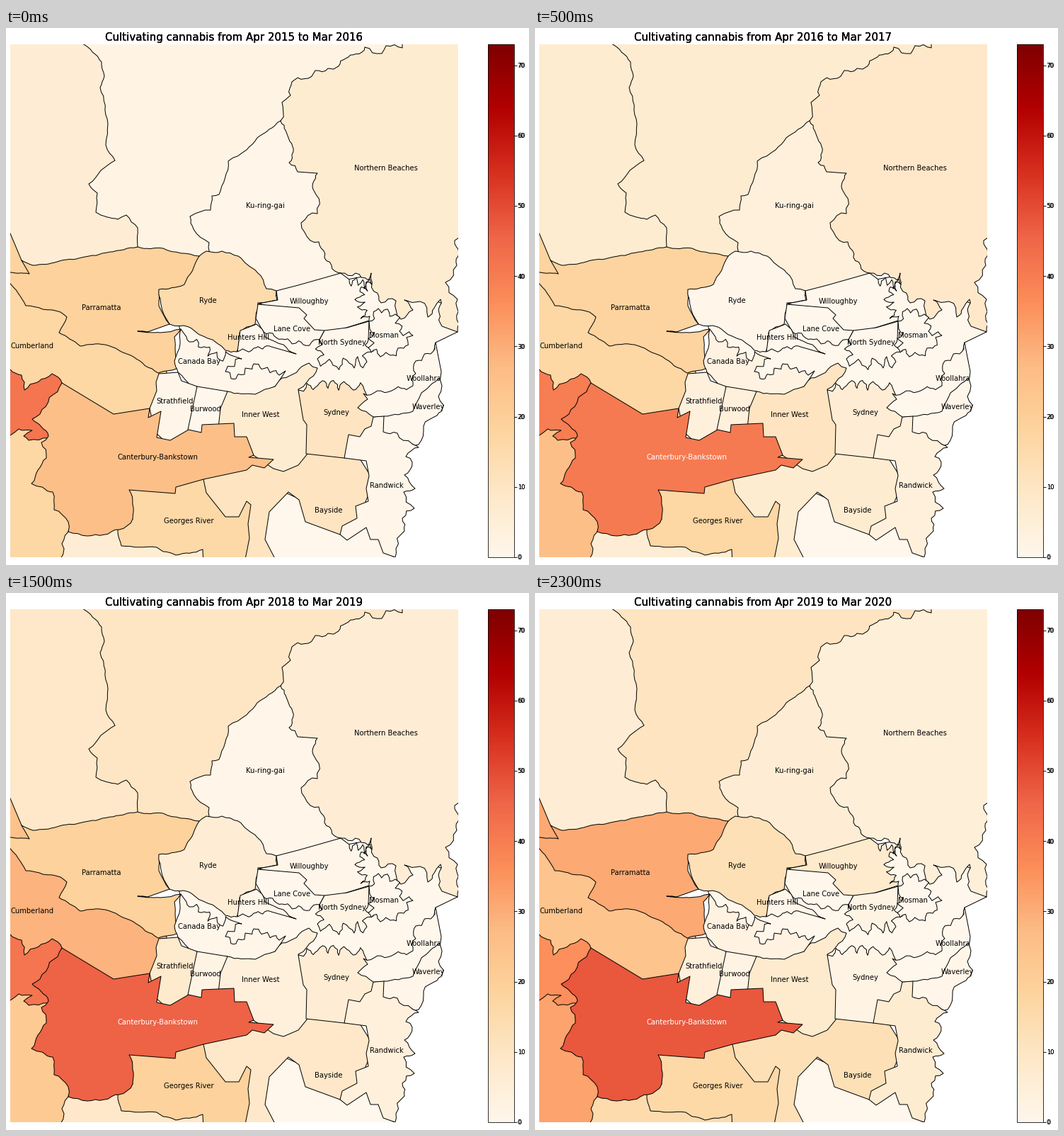
Recreate the animation shown at these times as a matplotlib script. Size 739 by 758 pixels, loop 2.5 s.

```python
import math
import random

import matplotlib.pyplot as plt
from matplotlib.animation import FuncAnimation
from matplotlib.patches import Polygon, Rectangle

W, H, DPI = 739, 758, 64
PX = 72 / DPI  # points per pixel
VMAX = 73
LEFT, TOP, RIGHT, BOTTOM = 6, 22.5, 639, 747

random.seed(4)
plt.rcParams["font.family"] = "DejaVu Sans"
fig = plt.figure(figsize=(W / DPI, H / DPI), dpi=DPI, facecolor="white")
ax = fig.add_axes([0, 0, 1, 1])
ax.axis("off")
cmap = plt.get_cmap("OrRd")
frame_box = Rectangle((LEFT, TOP), RIGHT - LEFT, BOTTOM - TOP, fc="none", ec="none")
ax.add_patch(frame_box)
areas = []


def write(x, y, text, size, **kw):
    return ax.text(x, y, text, fontsize=size * PX, va="baseline", **kw)


def beside(a, b, t, shift):
    """Point at share t of side a-b, moved sideways by shift pixels."""
    dx, dy = b[0] - a[0], b[1] - a[1]
    d = math.hypot(dx, dy) or 1
    return a[0] + dx * t - dy / d * shift, a[1] + dy * t + dx / d * shift


def wiggle(points, k=0.13, step=8):
    """River or coast: split each side at random bends until it is short."""
    out = [points[0]]
    for a, b in zip(points, points[1:]):
        d = math.dist(a, b)
        if d > step:
            mid = beside(a, b, 0.5, random.uniform(-k, k) * min(d, 28))
            out += wiggle([a, mid, b], k, step)[1:]
        else:
            out.append(b)
    return out


def coves(points, depth=6, step=7):
    """Harbour shore: inlets and points in turn along each side."""
    out, sign = [points[0]], 1
    for a, b in zip(points, points[1:]):
        n = max(1, round(math.dist(a, b) / step))
        for i in range(1, n):
            out.append(beside(a, b, i / n, sign * depth * random.uniform(0.4, 1)))
            sign = -sign
        out.append(b)
    return wiggle(out, 0.16, 6)


def area(counts, points, name="", at=(0, 0)):
    """Later areas cover earlier ones, so each border is traced only once."""
    shape = Polygon(points, ec="black", lw=PX, joinstyle="round",
                    zorder=1 + len(areas) / 100)
    ax.add_patch(shape)
    shape.set_clip_path(frame_box)
    label = write(at[0], at[1] + 3.7, name, 10, ha="center", zorder=3)
    areas.append((counts, shape, label))


NONE = [0] * 5

# Harbour and bay
area(NONE, [(240, 400), (340, 380), (510, 350), (620, 390), (638, 429), (607, 444),
            (590, 530), (480, 560), (260, 490)])
area(NONE, [(360, 640), (470, 690), (540, 690), (549, 760), (360, 760)])

# Northern areas
area([2, 7, 5, 10, 11], [(0, 10), (575, 10), (480, 300), (280, 330), (0, 335)])
area([6, 7, 8, 9, 6], [(0, 10), (95, 10)] + wiggle([
    (108, 22), (135, 48), (139, 68), (133, 84), (144, 135), (141, 165), (154, 187),
    (134, 201), (117, 220), (129, 233), (127, 260), (158, 270), (170, 264), (186, 282),
    (186, 309)], 0.08) + [(186, 325), (40, 345), (0, 345)])
area([1, 4, 4, 1, 6], wiggle([
    (388, 131), (355, 155), (340, 172), (314, 188), (301, 235), (291, 237), (289, 257),
    (260, 266), (265, 284), (287, 303), (287, 315)], 0.09) + [
    (300, 330), (375, 380), (470, 352), (478, 335), (450, 200), (410, 140)],
    "Ku-ring-gai", (366, 250))
area([7, 9, 4, 6, 5], wiggle([
    (561, 15), (560, 28), (537, 25), (531, 36), (507, 27), (480, 43), (455, 57), (437, 60),
    (404, 76), (402, 95), (390, 105), (388, 131), (401, 160), (400, 190), (412, 203)], 0.2)
    + wiggle([
        (440, 205), (438, 235), (440, 262), (417, 275), (430, 300), (442, 302), (460, 335),
        (473, 346), (512, 356), (516, 346), (520, 372), (530, 388), (551, 385), (558, 411),
        (575, 398), (563, 384), (585, 386), (596, 408), (614, 383), (616, 421)], 0.2)
    + wiggle([(638, 429), (638, 383), (621, 359), (637, 335), (634, 300), (642, 290)], 0.2)
    + [(650, 15)], "Northern Beaches", (537, 197))
area([18, 18, 31, 25, 31], [(0, 275), (6, 290), (22, 328), (40, 350), (0, 350)])
area([15, 1, 10, 6, 13], wiggle([
    (231, 418), (210, 360), (273, 322), (283, 315), (305, 315), (328, 322), (355, 345),
    (368, 368), (382, 371), (383, 384), (356, 388), (352, 418), (330, 430), (326, 457),
    (310, 455), (285, 438), (262, 424), (231, 418)], 0.1), "Ryde", (285, 384))

# Western areas
area([17, 17, 22, 29, 24], [
    (0, 352), (100, 380), (225, 450), (230, 545), (190, 560), (70, 560), (0, 530)],
    "Cumberland", (37, 448))
area([19, 18, 32, 19, 31], wiggle([
    (22, 328), (38, 335), (107, 324), (186, 309), (222, 311), (273, 322), (252, 362),
    (216, 369), (216, 392), (231, 418)], 0.06) + wiggle([
        (200, 429), (186, 428), (218, 430), (247, 425), (238, 436), (243, 480), (215, 487),
        (180, 464), (140, 447), (105, 449), (75, 430), (86, 408), (77, 401), (28, 392),
        (4, 358), (0, 344), (33, 347)], 0.06), "Parramatta", (135, 394))
area([17, 26, 32, 22, 32], [
    (0, 560), (55, 565), (100, 690), (100, 760), (0, 760)])
area([42, 40, 45, 42, 36], [(0, 482)] + wiggle([
    (6, 482), (22, 490), (26, 511), (65, 488), (79, 501)]) + [(70, 560)] + wiggle([
        (60, 579), (32, 582), (25, 576), (37, 568), (18, 566), (6, 575)]) + [(0, 580)])

# Southern areas
area([6, 6, 7, 9, 15], wiggle([(66, 760), (82, 735), (79, 728), (90, 706)]) + [
    (170, 690), (300, 690), (300, 760)])
area([11, 7, 7, 9, 13], [(330, 720), (330, 760), (379, 760), (379, 747)] + [
    (366, 722), (372, 683), (399, 655), (414, 666), (423, 697), (472, 715), (490, 712),
    (520, 640), (495, 600), (270, 600), (270, 690)], "Bayside", (456, 680))
area([16, 17, 12, 19, 16], [(174, 640)] + wiggle([
    (174, 685), (179, 693), (158, 708), (163, 731), (213, 733), (222, 739), (240, 744),
    (278, 736)], 0.06) + [
    (279, 760), (336, 760), (344, 720), (342, 700), (346, 673), (340, 668), (329, 690),
    (310, 690), (283, 656), (279, 637), (279, 620)], "Georges River", (258, 695))

# Inner areas
area([7, 11, 4, 4, 8], [(310, 580), (290, 540), (300, 505), (360, 510)] + wiggle([
    (380, 506), (390, 494), (428, 473), (440, 480), (425, 500), (413, 510)]) + [
    (435, 590), (413, 617), (392, 626), (378, 622), (330, 590)], "Inner West", (360, 545))
area([11, 6, 4, 6, 2], [(424, 601), (478, 607), (505, 595), (530, 555), (515, 530)]
     + coves([(506, 510), (485, 505), (440, 505), (413, 511)], 8)
     + [(420, 553), (425, 560)], "Sydney", (467, 542))
area([1, 4, 3, 4, 7], [
    (484, 574), (500, 577), (507, 566), (516, 562), (519, 549), (560, 545)] + wiggle([
        (574, 587), (583, 592), (565, 605), (574, 613), (563, 631), (578, 650),
        (562, 655), (577, 678), (560, 692), (563, 710), (551, 735), (550, 747)], 0.2) + [
    (533, 741), (526, 722), (515, 722), (509, 705), (482, 723), (472, 715), (475, 703),
    (496, 692), (494, 675), (512, 668), (509, 650), (513, 632), (509, 611), (478, 607)],
    "Randwick", (538, 645))
area(NONE, wiggle([(519, 549), (497, 536), (511, 524)]) + coves([
    (505, 516), (545, 512), (575, 505), (579, 470), (600, 460), (607, 444)], 4, 9) + wiggle([
        (615, 485), (612, 500)]) + [(590, 540), (560, 560), (534, 548)],
    "Woollahra", (591, 494))
area([0, 1, 1, 1, 1], wiggle([
    (613, 495), (587, 515), (575, 541), (534, 548)], 0.08) + wiggle([
        (533, 570), (553, 572), (574, 587), (583, 588), (590, 562), (609, 547), (618, 532),
        (611, 520), (616, 505)], 0.2), "Waverley", (597, 534))
area([1, 3, 2, 1, 3], wiggle([
    (247, 425), (246, 446), (238, 470), (243, 486), (262, 506), (313, 513), (352, 517),
    (380, 506), (395, 484)], 0.06) + coves([
        (386, 490), (350, 474), (325, 495), (310, 485), (333, 467)], 5) + coves([
            (318, 462), (299, 466), (280, 450), (255, 436)], 7), "Canada Bay", (273, 470))
area([1, 4, 3, 8, 4], [
    (216, 488), (243, 486), (248, 498), (270, 506), (265, 575), (232, 590), (210, 570),
    (203, 537), (213, 512), (212, 500)], "Strathfield", (239, 526))
area([0, 4, 2, 2, 2], [
    (270, 506), (313, 513), (303, 537), (300, 565), (265, 580), (257, 567)],
    "Burwood", (282, 537))
area([26, 41, 59, 46, 48], wiggle([
    (79, 501), (48, 545), (37, 552), (60, 576), (50, 585), (57, 607), (36, 643), (66, 655),
    (68, 680), (88, 697), (88, 711), (115, 717), (160, 708), (179, 693), (174, 652)]) + [
    (239, 657), (240, 648), (279, 637), (340, 624), (348, 617), (365, 621), (378, 609),
    (343, 606), (350, 603), (340, 577), (323, 577), (322, 558), (277, 560), (276, 571),
    (258, 567), (232, 582), (213, 578), (219, 541), (201, 550), (203, 537), (152, 545)],
    "Canterbury-Bankstown", (215, 605))

# North shore
area([0, 0, 0, 1, 8], [(382, 371), (413, 363), (473, 346)] + coves([
    (485, 355), (517, 362), (500, 372), (503, 398), (513, 413)], 9, 5) + [
    (465, 428), (436, 428), (400, 400), (357, 389), (384, 384)],
    "Willoughby", (428, 385))
area(NONE, [(356, 390), (414, 395), (425, 405), (421, 410), (436, 426), (450, 427)]
     + coves([(443, 440), (420, 447), (390, 439), (362, 426)], 4) + [(353, 410)],
     "Lane Cove", (404, 424))
area([0, 0, 0, 1, 1], wiggle([(354, 418), (366, 436), (392, 447), (410, 460)])
     + coves([(375, 450), (350, 452), (327, 457)], 4) + [(331, 427)],
     "Hunters Hill", (342, 436))
area([0, 0, 0, 2, 2], [(450, 427), (482, 423), (513, 414)] + coves([
    (512, 440), (510, 471), (485, 473), (462, 476), (440, 467), (443, 440)], 9),
    "North Sydney", (475, 443))
area(NONE, coves([
    (513, 414), (526, 396), (550, 404), (556, 428), (575, 434), (562, 452), (543, 462),
    (516, 458), (514, 425)], 6), "Mosman", (534, 433))

# Colour bar
ax.imshow([[i / 255] for i in range(256)], cmap=cmap, origin="lower", aspect="auto",
          extent=(681, 718, BOTTOM, 23), interpolation="nearest")
ax.add_patch(Rectangle((681, 23), 37, BOTTOM - 23, fc="none", ec="black", lw=0.8 * PX))
for tick in range(0, VMAX, 10):
    y = BOTTOM - tick * (BOTTOM - 23) / VMAX
    ax.plot([718, 721.5], [y, y], color="black", lw=0.9 * PX, solid_capstyle="butt")
    for x in (722.6, 723.3):
        write(x, y + 3.3, str(tick), 8.3)

titles = [write(322.5, 17.8, "", 15, ha="center") for _ in range(3)]
ax.set_xlim(0, W)
ax.set_ylim(H, 0)


def draw(i):
    for title in titles:
        title.set_text(f"Cultivating cannabis from Apr {2015 + i} to Mar {2016 + i}")
    for counts, shape, label in areas:
        shape.set_facecolor(cmap(counts[i] / VMAX))
        label.set_color("white" if counts[i] > VMAX * 0.55 else "black")


anim = FuncAnimation(fig, draw, frames=5, interval=500, repeat=True, repeat_delay=0)
plt.show()
```
